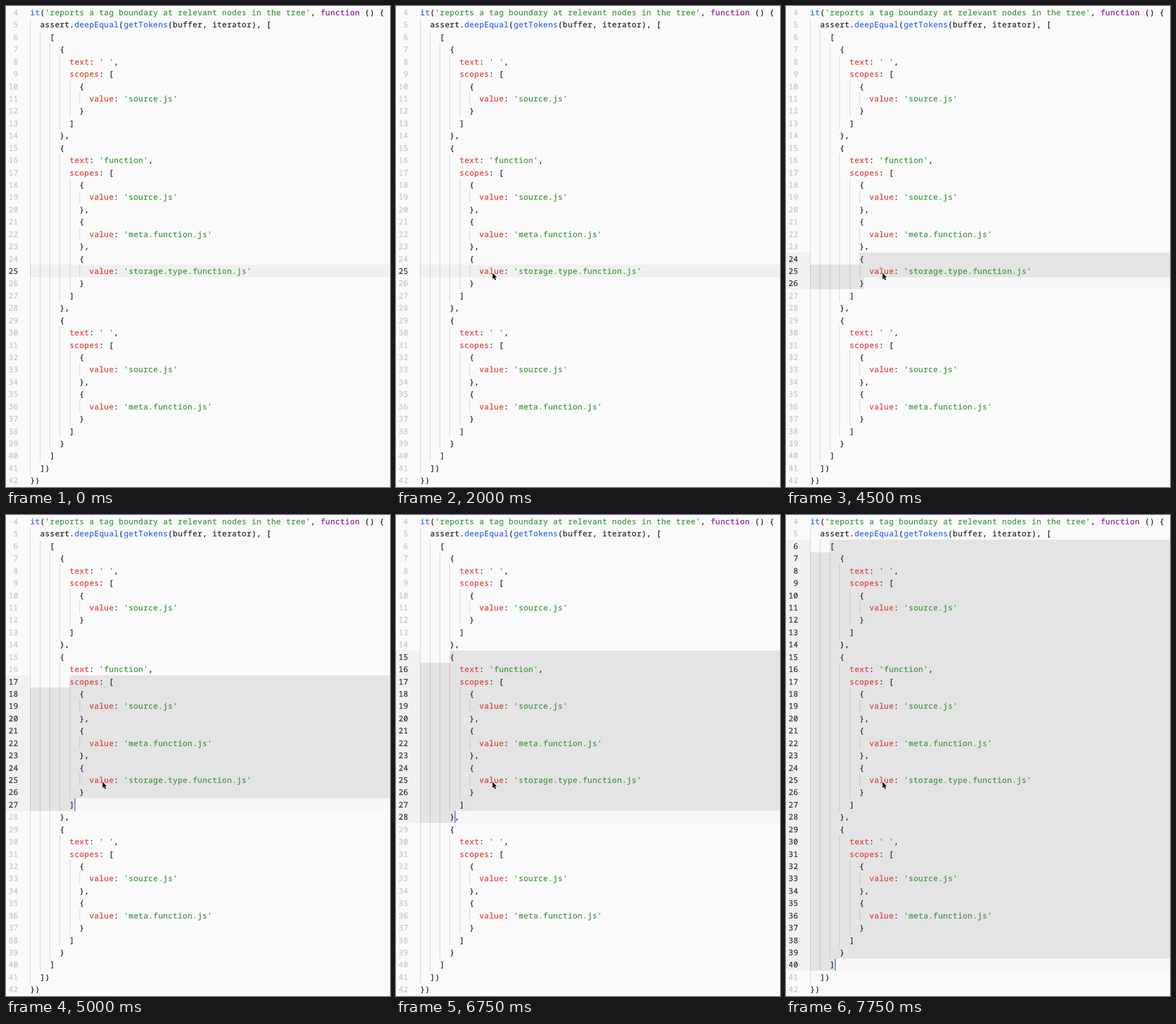
These frames come from a looping animation (669x837 px, 8 s). An HTML page:

```html
<!DOCTYPE html>
<html lang="en">
<head>
<meta charset="utf-8">
<title>Growing selection</title>
<style>
  html, body { margin: 0; width: 100%; height: 100%; overflow: hidden; background: #fafafa; }
  svg { display: block; width: 669px; height: 837px; }
  text {
    font: 13.3px "Noto Sans Mono", "DejaVu Sans Mono", monospace;
    color: #24262d;
    fill: currentColor;
    stroke: currentColor;
    stroke-width: .28;
    white-space: pre;
    text-rendering: geometricPrecision;
  }
  .string { color: #3f973d; }
  .key { color: #df4238; }
  .call { color: #2f68ec; }
  .keyword { color: #961b95; }
  .num { color: #c6c6c8; }
  .num.on { color: #33353c; }
  .guide { fill: #383a42; fill-opacity: .2; }
  .caret { fill: #4166f0; }
</style>
</head>
<body>
<svg viewBox="0 0 669 837">
  <g id="back"></g>
  <g id="guides"></g>
  <g id="code"></g>
  <rect id="caret" class="caret" width="1.5"/>
  <path id="mouse" d="M0 0V10.6L2.4 8.4L4.1 12.3L5.9 11.5L4.2 7.7H7.5Z"
        fill="#000" stroke="#fff" stroke-width="1.3" paint-order="stroke"/>
</svg>
<script>
const SOURCE = `it('reports a tag boundary at relevant nodes in the tree', function () {
  assert.deepEqual(getTokens(buffer, iterator), [
    [
      {
        text: ' ',
        scopes: [
          {
            value: 'source.js'
          }
        ]
      },
      {
        text: 'function',
        scopes: [
          {
            value: 'source.js'
          },
          {
            value: 'meta.function.js'
          },
          {
            value: 'storage.type.function.js'
          }
        ]
      },
      {
        text: ' ',
        scopes: [
          {
            value: 'source.js'
          },
          {
            value: 'meta.function.js'
          }
        ]
      }
    ]
  ])
})`;

const LOOP = 8000, STEP = 250, W = 669;
const FIRST = 4, CLICKED = 25;
const CH = 60 / 7, ROW = 150 / 7, LEFT = 42, TOP = 0.27;
const TOKEN = /(?<string>'[^']*')|(?<key>text|scopes|value)|(?<call>^it|deepEqual|getTokens)|(?<keyword>function)|[^\s]/g;

const lines = SOURCE.split('\n');
const $ = id => document.getElementById(id);
const indentOf = row => lines[row - FIRST].search(/\S/);
const colX = col => LEFT + col * CH;
const rowY = row => TOP + (row - FIRST) * ROW;
const edge = row => Math.round(rowY(row));

function add(parent, tag, attrs, text) {
  const el = document.createElementNS('http://www.w3.org/2000/svg', tag);
  for (const k in attrs) el.setAttribute(k, attrs[k]);
  if (text) el.textContent = text;
  return parent.appendChild(el);
}

// Text on the character grid
function write(str, x, row, cls) {
  const xs = [...str].map((c, i) => (x + 0.3 + i * CH).toFixed(2)).join(' ');
  return add($('code'), 'text', { x: xs, y: (rowY(row) + 15.7).toFixed(2), class: cls }, str);
}

const numbers = lines.map((line, i) => {
  const row = FIRST + i;
  for (let col = 0; col < indentOf(row); col += 2) {
    add($('guides'), 'rect', {
      x: Math.round(colX(col)), y: edge(row), width: 1,
      height: edge(row + 1) - edge(row), class: 'guide'
    });
  }
  for (const m of line.matchAll(TOKEN)) {
    const cls = Object.keys(m.groups).find(k => m.groups[k]) || 'plain';
    write(m[0], colX(m.index), row, cls);
  }
  return write(String(row).padStart(2, '\u00a0'), 4.1, row, 'num');
});

// The next wider block: out to the nearest less indented row on both sides
function grow({ top, bottom }) {
  const inner = indentOf(top);
  while (indentOf(top) >= inner) top--;
  while (indentOf(bottom) >= inner) bottom++;
  return { top, bottom, from: indentOf(top), to: indentOf(bottom) + 1 };
}

const click = { time: 0, blink: 1600, top: CLICKED, bottom: CLICKED, from: 14, to: 14 };
const pair = {
  time: 2500, blink: 3250, top: CLICKED, bottom: CLICKED,
  from: indentOf(CLICKED), to: lines[CLICKED - FIRST].length
};
const states = [click, pair];
for (const time of [4000, 5000, 6750, 7750]) {
  states.push({ time, blink: time, ...grow(states[states.length - 1]) });
}

function band(x, row, end, fill, rows = 1) {
  const y = edge(row);
  add($('back'), 'rect', { x, y, width: end - x, height: edge(row + rows) - y, fill });
}

function drawSelection({ top, bottom, from, to }) {
  const fill = '#e4e4e4', rows = bottom - top + 1;
  $('back').replaceChildren();
  numbers.forEach((n, i) => n.classList.toggle('on', i + FIRST >= top && i + FIRST <= bottom));
  if (rows === 1 && from === to) return band(LEFT, top, W, '#f0f0f0');
  band(0, top, LEFT, '#f1f1f1', rows);
  if (rows === 1) return band(colX(from), top, colX(to), fill);
  band(colX(from), top, W, fill);
  band(LEFT, top + 1, W, fill, rows - 2);
  band(LEFT, bottom, colX(to), fill);
  band(colX(to), bottom, W, '#f7f7f7');
}

function drawCaret({ blink, bottom, to }, t) {
  const el = $('caret');
  const on = t >= blink && (t - blink) % 800 < 400;
  el.setAttribute('visibility', on ? 'visible' : 'hidden');
  el.setAttribute('x', colX(to) + 0.2);
  el.setAttribute('y', edge(bottom));
  el.setAttribute('height', edge(bottom + 1) - edge(bottom));
}

// The pointer comes in from the upper right and slows down
function drawMouse(t) {
  const glide = (a, b, time, power) =>
    b + (a - b) * Math.max(0, 1 - (t - STEP) / time) ** power;
  const x = glide(529.5, 168.3, 750, 2.7), y = glide(200.5, 464.6, 1000, 4);
  $('mouse').setAttribute('visibility', t < STEP ? 'hidden' : 'visible');
  $('mouse').setAttribute('transform', `translate(${x} ${y})`);
}

const start = performance.now();
let shown, last;
function tick() {
  const t = Math.floor((performance.now() - start) % LOOP / STEP) * STEP;
  if (t !== last) {
    last = t;
    const state = states.filter(s => s.time <= t).pop();
    if (state !== shown) drawSelection(shown = state);
    drawCaret(state, t);
    drawMouse(t);
  }
  requestAnimationFrame(tick);
}
tick();
</script>
</body>
</html>
```
